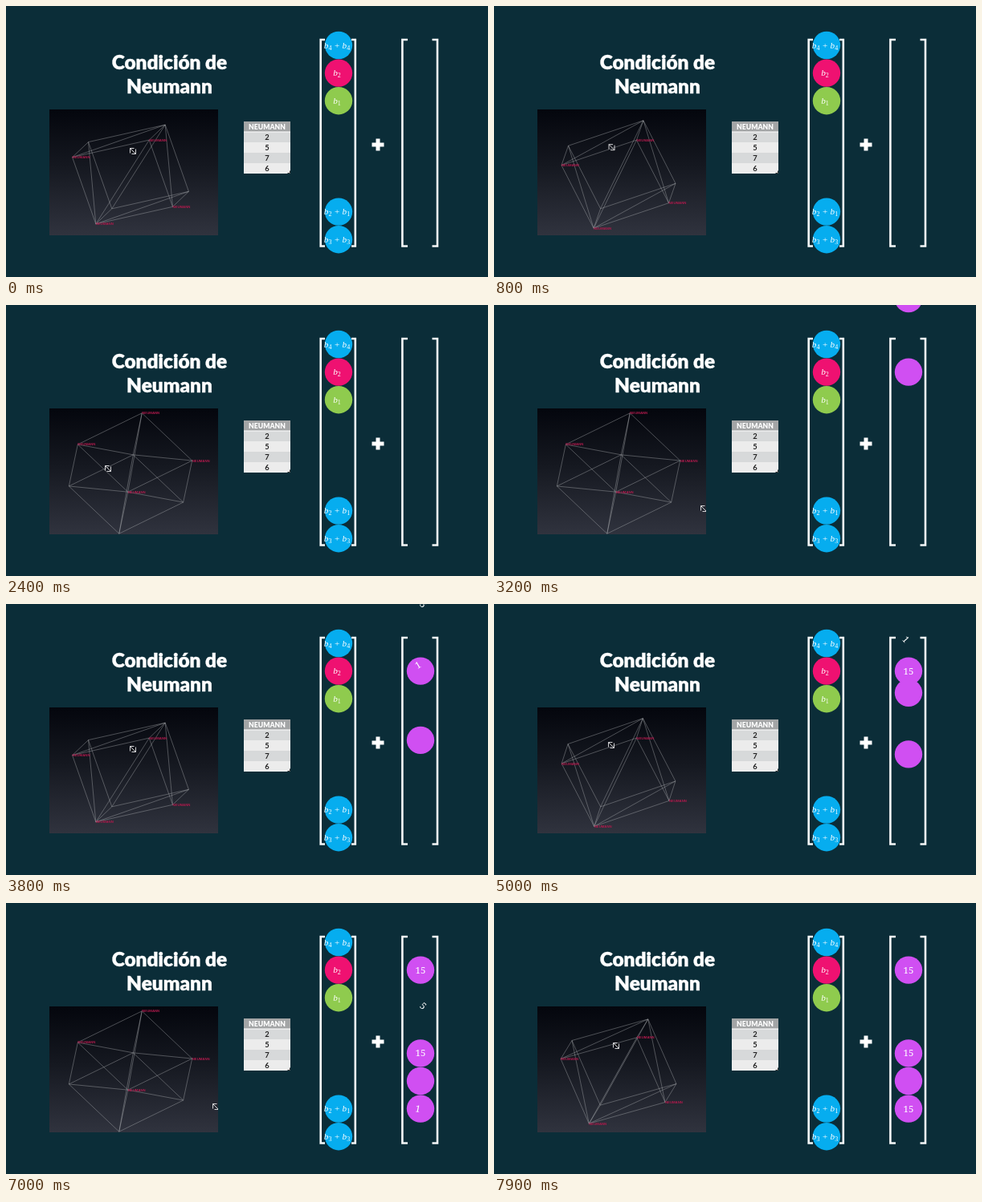
These frames come from a looping animation (600 by 338 pixels, 8 s). An HTML page:

```html
<!DOCTYPE html>
<html lang="es">
<head>
<meta charset="utf-8">
<title>Condición de Neumann</title>
<style>
  html, body { margin: 0; width: 100%; height: 100%; overflow: hidden; background: #0b2d38; }
  svg { display: block; width: 100vw; height: 100vh; }
  text { text-anchor: middle; }
  .title { font: 900 24.4px Lato, sans-serif; fill: #fff; stroke: #fff; stroke-width: .4; }
  .cell { font: 700 9.4px Lato, sans-serif; fill: #222; }
  .head { font: 900 8.6px Lato, sans-serif; fill: #fff; }
  .math { font: italic 11.2px "Liberation Serif", serif; fill: #fff; }
  .math .sub { font-size: 8px; font-style: normal; }
  .digit { font: 11.5px "Noto Serif", serif; fill: #fff; }
  .label { font: 700 4.3px "Liberation Sans", sans-serif; fill: #b01a4c; text-anchor: start; }
</style>
</head>
<body>
<svg viewBox="0 0 600 338">
  <defs>
    <linearGradient id="shade" x2="0" y2="1">
      <stop offset="0" stop-color="#04060d"/>
      <stop offset=".45" stop-color="#151820"/>
      <stop offset="1" stop-color="#30333e"/>
    </linearGradient>
    <clipPath id="panel"><rect x="54" y="129" width="210" height="157"/></clipPath>
  </defs>
  <rect width="600" height="338" fill="#0b2d38"/>
  <text class="title" x="203.5" y="79">Condición de</text>
  <text class="title" x="203.5" y="109">Neumann</text>
  <g clip-path="url(#panel)">
    <rect x="54" y="129" width="210" height="157" fill="url(#shade)"/>
    <path id="mesh" fill="none" stroke="#b4b6ba" stroke-width=".65" stroke-opacity=".6"/>
    <g id="labels"></g>
    <path id="cursor" d="M-3.500 2.500V-3.500H1.500M3.500 -2.500V3.500H-1.500M-3.500 -3.500L3.500 3.500"
          fill="none" stroke="#d4d4d6"/>
  </g>
  <g id="table"></g>
  <path d="M397 42H391.700V299.500H397M430 42H434.800V299.500H430M500 42H493.400V299.500H500M530.500 42H537V299.500H530.500"
        fill="none" stroke="#f4f7f8" stroke-width="2.6"/>
  <path d="M455.500 173H470.500M463 165.500V180.500" stroke="#fff" stroke-width="5"/>
  <g id="terms"></g>
  <g id="drops"></g>
</svg>
<script>
const LOOP = 8000, CLIP = 3800, CLIP_RESTART = 3550;
const FALL = 700, SPIN = 800;
const $ = id => document.getElementById(id);
const clamp = v => Math.max(0, Math.min(1, v));
const lerp = (a, b, k) => a + (b - a) * k;
const rowY = row => 49 + row * 34.6;

function add(parent, tag, attrs, text) {
  const el = document.createElementNS("http://www.w3.org/2000/svg", tag);
  for (const key in attrs) el.setAttribute(key, attrs[key]);
  if (text) el.textContent = text;
  parent.appendChild(el);
  return el;
}

// The pointer's drag, which turns the cube, and the cube's roll in degrees.
const drag = [
  { at: 0, x: 158, y: 181, roll: 17 },
  { at: 300, x: 152, y: 178, roll: 20.4 },
  { at: 850, x: 146, y: 176, roll: 23.5 },
  { at: 1200, x: 146, y: 176, roll: 23.5 },
  { at: 1400, x: 140, y: 184, roll: 25 },
  { at: 2150, x: 127, y: 204, roll: 38 }
];

function dragAt(t) {
  const next = drag.findIndex(key => key.at > t);
  if (next < 0) return drag[drag.length - 1];
  const a = drag[next - 1], b = drag[next];
  const k = (t - a.at) / (b.at - a.at);
  return { x: lerp(a.x, b.x, k), y: lerp(a.y, b.y, k), roll: lerp(a.roll, b.roll, k) };
}

// Orthographic cube: corners 0-3 face the viewer, 4-7 lie behind them.
function cubeCorners({ x, y, roll }) {
  const nx = .0098 * (x - 138);
  const ny = .027 * (y - 185) - .006 * (x - 140);
  const cx = Math.sqrt(1 - nx * nx), shear = -nx * ny / cx;
  const cy = Math.sqrt(1 - shear * shear - ny * ny);
  const c = Math.cos(roll * Math.PI / 180), s = Math.sin(roll * Math.PI / 180);
  return Array.from({ length: 8 }, (_, i) => {
    const u = i % 4 === 1 || i % 4 === 2 ? 1 : -1;
    const v = i % 4 < 2 ? -1 : 1;
    const w = i < 4 ? -1 : 1;
    const along = u * c + v * s, across = v * c - u * s;
    return [155 + 51 * (cx * along + nx * w),
            210 + 44 * (shear * along + cy * across + ny * w)];
  });
}

const edges = [[1, 3], [5, 7]];
for (let i = 0; i < 4; i++) {
  const j = (i + 1) % 4;
  edges.push([i, j], [i + 4, j + 4], [i, i + 4], i % 3 ? [j, i + 4] : [i, j + 4]);
}
const labels = [0, 1, 2, 3].map(() => add($("labels"), "text", { class: "label" }, "NEUMANN"));

["NEUMANN", "2", "5", "7", "6"].forEach((value, i) => {
  const y = 144 + i * 13;
  add($("table"), "rect", { x: 296, y, width: 58, height: 13,
    fill: i ? (i % 2 ? "#d7d9da" : "#ececec") : "#a3a5a6" });
  add($("table"), "text", { class: i ? "cell" : "head", x: 325, y: y + 9.8 }, value);
});
add($("table"), "path", { d: "M296 157H354", stroke: "#fff" });
add($("table"), "path", { d: "M353.500 205.500V208.500H350.500", fill: "none", stroke: "#333" });

function term(row, fill, subs) {
  const y = rowY(row);
  add($("terms"), "circle", { cx: 414, cy: y, r: 17.2, fill });
  const text = add($("terms"), "text", { class: "math", x: 412, y: y + 3.5 });
  [...subs].forEach((sub, i) => {
    add(text, "tspan", i ? { dy: -2 } : {}, i ? " + b" : "b");
    add(text, "tspan", { class: "sub", dy: 2 }, sub);
  });
}
term(0, "#06adef", "44");
term(1, "#ef1171", "2");
term(2, "#8fcb4e", "1");
term(6, "#06adef", "21");
term(7, "#06adef", "33");

const drops = [
  { row: 1, fall: 2460, spin: 3160 },
  { row: 4, fall: 3160, spin: 4740 },
  { row: 6, fall: 4670, spin: 6210 },
  { row: 5, fall: 6280, spin: LOOP }
];
for (const drop of drops)
  drop.ball = add($("drops"), "circle", { cx: 516, r: 17.2, fill: "#d04ff2" });
for (const drop of drops)
  drop.digits = ["1", "5"].map(c => add($("drops"), "text", { class: "digit", y: 4 }, c));

function drawView(t) {
  const phase = t % CLIP < CLIP_RESTART ? t % CLIP : 0;
  const pose = dragAt(phase);
  const corners = cubeCorners(pose);
  const at = i => corners[i].map(v => v.toFixed(2)).join(" ");
  $("mesh").setAttribute("d", edges.map(([a, b]) => `M${at(a)}L${at(b)}`).join(""));
  labels.forEach((el, i) => {
    el.setAttribute("x", corners[i][0]);
    el.setAttribute("y", corners[i][1] + 1.5);
  });
  const leave = clamp((phase - 2550) / 550);
  $("cursor").setAttribute("transform",
    `translate(${lerp(pose.x, 261, leave)} ${lerp(pose.y, 254, leave)})`);
}

// Digits swing faster and less as they land.
function swing(q) {
  const p = Math.max(0, Math.min(1.1, q));
  return 55 * Math.sqrt(1.1 - p) * Math.cos(2.4 * Math.PI * p ** 4);
}

function drawDrop({ row, fall, spin, ball, digits }, t) {
  const y = rowY(row);
  ball.setAttribute("cy", lerp(-20, y, clamp((t - fall) / FALL)));
  digits.forEach((el, i) => {
    const q = (t - spin) / SPIN - i * .5;
    el.setAttribute("transform",
      `translate(${512.7 + i * 6.6} ${lerp(-45, y, clamp(q / .85))}) rotate(${swing(q)})`);
  });
}

const begin = performance.now();
function tick() {
  const t = Math.max(0, performance.now() - begin) % LOOP;
  drawView(t);
  drops.forEach(drop => drawDrop(drop, t));
  requestAnimationFrame(tick);
}
tick();
</script>
</body>
</html>
```
